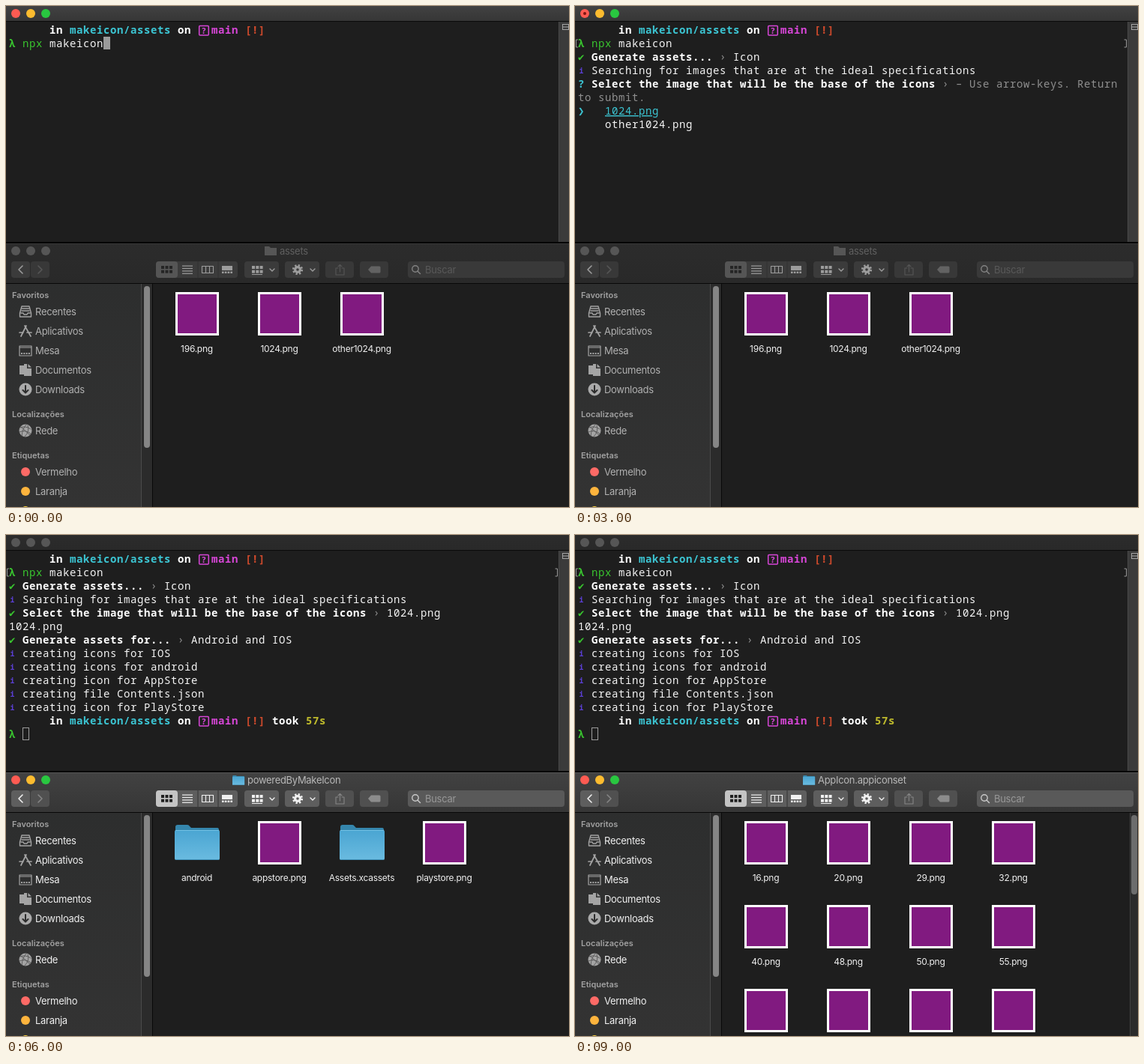
An HTML page for the animation above (10 s loop, 751 px wide and 669 px high).

```html
<!DOCTYPE html>
<html lang="pt">
<head>
<meta charset="utf-8">
<title>makeicon</title>
<style>
  html, body { margin: 0; width: 100%; height: 100%; overflow: hidden; background: #1e1e1e; }
  svg { display: block; width: 751px; height: 669px; }
  text { white-space: pre; font: 13px Inter, sans-serif; letter-spacing: -.3px; }
  .mono { font: 500 14px 'Noto Sans Mono', 'DejaVu Sans Mono', monospace; letter-spacing: .6px; }
  .bold { font-weight: 700; }
  .under { text-decoration: underline; }
  .label { font-size: 12px; letter-spacing: -.26px; text-anchor: middle; }
  .head { font-size: 11px; font-weight: 600; letter-spacing: 0; }
</style>
</head>
<body>
<svg id="stage" viewBox="0 0 751 669">
  <defs>
    <linearGradient id="lit" x2="0" y2="1"><stop stop-color="#424242"/><stop offset="1" stop-color="#363636"/></linearGradient>
    <linearGradient id="dim" x2="0" y2="1"><stop stop-color="#2c2c2c"/><stop offset="1" stop-color="#292929"/></linearGradient>
    <linearGradient id="side" x2="0" y2="1"><stop stop-color="#2d2e2e"/><stop offset="1" stop-color="#333"/></linearGradient>
    <linearGradient id="blue" x2="0" y2="1"><stop stop-color="#4aa5d2"/><stop offset="1" stop-color="#6abbe0"/></linearGradient>
    <g id="folder">
      <path d="M1 45V3Q1 0 4 0H17Q19 0 20 2L22 4H57Q59 4 59 7V45Z" fill="#3586ad"/>
      <rect y="7" width="60" height="40" rx="2" fill="url(#blue)"/>
      <path d="M1 7.5H59" stroke="#73c2e6"/>
      <path d="M1 46.5H59" stroke="#3f92bb"/>
    </g>
    <g id="picture"><rect width="58" height="58" fill="#fff"/><rect x="3" y="3" width="52" height="52" fill="#811a80"/></g>
  </defs>
  <g id="scene"></g>
</svg>
<script>
const LOOP = 10000, STEP = 1000, COL = 9, ROW = 18;
const scene = document.getElementById('scene');

// style key: [colour, extra class]
const STYLES = {
  w: ['#f4f4f4', ''], W: ['#fff', 'bold'], c: ['#3cc5d3', ''], C: ['#3cc5d3', 'bold'],
  u: ['#3cc5d3', 'under'], g: ['#39c52f', ''], G: ['#39c52f', 'bold'], d: ['#8f8f8f', ''],
  M: ['#d846d8', 'bold'], R: ['#cf4a2c', 'bold'], Y: ['#bdb92c', 'bold'], i: ['#5b3fd6', 'bold']
};

const rect = (x, y, w, h, fill, more = '') => `<rect x="${x}" y="${y}" width="${w}" height="${h}" fill="${fill}" ${more}/>`;
const circle = (x, y, r, fill) => `<circle cx="${x}" cy="${y}" r="${r}" fill="${fill}"/>`;
const text = (x, y, s, fill, cls = '') => `<text x="${x}" y="${y}" fill="${fill}" class="${cls}">${s}</text>`;
const stroke = (d, color, w = 1.3) => `<path d="${d}" fill="none" stroke="${color}" stroke-width="${w}" stroke-linecap="round" stroke-linejoin="round"/>`;
const fill = (d, color) => `<path d="${d}" fill="${color}" fill-rule="evenodd"/>`;

// terminal lines: flat lists of style, text, style, text...
const home = ['W', '      in ', 'C', 'makeicon/assets', 'W', ' on ', 'box', '  ', 'M', 'main ', 'R', '[!]'];
const command = ['G', 'λ ', 'g', 'npx ', 'w', 'makeicon'];
const ask = q => ['C', '? ', 'W', q, 'd', ' › – Use arrow-keys. Return to submit.'];
const done = (q, a) => ['G', '✔ ', 'W', q, 'd', ' › ', 'w', a];
const info = s => ['i', 'i ', 'w', s];
const chosen = (s, hint = '') => ['C', '❯   ', 'u', s, 'd', hint];
const option = (s, style = 'w') => [style, '    ' + s];

const KIND = 'Generate assets...', BASE = 'Select the image that will be the base of the icons', FOR = 'Generate assets for...';
const begin = [home, command];
const searched = [...begin, done(KIND, 'Icon'), info('Searching for images that are at the ideal specifications')];
const based = [...searched, done(BASE, '1024.png'), ['w', '1024.png']];
const SCREENS = {
  typed: begin,
  kind: [...begin, ask(KIND), option('Icon and Splash', 'd'), chosen('Icon', ' – Create icon only'), option('Splash', 'd')],
  base: [...searched, ['C', '? ', 'W', BASE, 'd', ' › – Use arrow-keys. Return'], ['d', 'to submit.'],
    chosen('1024.png'), option('other1024.png')],
  platform: [...based, ask(FOR), chosen('Android and IOS'), option('Android'), option('IOS')],
  finished: [...based, done(FOR, 'Android and IOS'), info('creating icons for IOS'), info('creating icons for android'),
    info('creating icon for AppStore'), info('creating file Contents.json'), info('creating icon for PlayStore'),
    [...home, 'W', ' took ', 'Y', '57s'], ['G', 'λ ']]
};

const pngs = names => names.split(' ').map(n => n + '.png');
const FOLDERS = {
  assets: ['assets', 365, pngs('196 1024 other1024')],
  created: ['assets', 365, [...pngs('196 1024 other1024'), '/poweredByMakeI|con']],
  powered: ['poweredByMakeIcon', 322, ['/android', 'appstore.png', '/Assets.xcassets', 'playstore.png']],
  xcassets: ['Assets.xcassets', 336, ['/AppIcon.appicons|et']],
  iconset: ['AppIcon.appiconset', 324, pngs('16 20 29 32 40 48 50 55 57 58 60 64')]
};

// one entry per second: screen, folder
const STEPS = [
  ['typed', 'assets'], ['typed', 'assets'], ['kind', 'assets'], ['base', 'assets'], ['platform', 'assets'],
  ['finished', 'created'], ['finished', 'powered'], ['finished', 'powered'], ['finished', 'xcassets'], ['finished', 'iconset']
];

function lights(y, on) {
  const colors = on ? ['#fe5b52', '#fdbc2f', '#29c740'] : Array(3).fill('#565656');
  return colors.map((c, i) => circle(13 + 20 * i, y, 6, c)).join('');
}

function line(parts, row) {
  let col = 0, out = '';
  const y = 37 + ROW * row;
  for (let i = 0; i < parts.length; i += 2) {
    const key = parts[i], s = parts[i + 1], body = s.trimStart();
    const x = 4 + COL * (col + s.length - body.length);
    if (key === 'box') {
      out += rect(4 + COL * col + 1.7, y - 10.5, 12.6, 12.4, 'none', 'stroke="#d846d8" stroke-width="1.5" rx="1"')
        + `<text x="${4 + COL * col + 4.6}" y="${y - .3}" fill="#d846d8" class="mono bold" style="font-size:11px">?</text>`;
    } else if (key === 'i') {
      out += `<text x="${x + 1.5}" y="${y - 1}" fill="${STYLES.i[0]}" class="mono bold" style="font-size:10px">i</text>`;
    } else if (body) {
      out += text(x, y, body.trimEnd(), STYLES[key][0], 'mono ' + STYLES[key][1]);
    }
    col += s.length;
  }
  return out;
}

function terminal(name, active) {
  const typed = name === 'typed', finished = name === 'finished';
  let out = rect(0, 0, 751, 317, '#1e1e1e') + rect(0, 0, 751, 20, active ? 'url(#lit)' : 'url(#dim)')
    + rect(0, 20, 751, 1, '#0a0a0a') + lights(10, active);
  if (!typed && !finished) out += circle(13, 10, 2, '#7c1310');
  out += rect(738, 21, 13, 294, '#3b3b3b') + rect(737, 21, 1, 294, '#494949')
    + rect(742.5, 24.5, 8, 7, 'none', 'stroke="#a5a5a5"') + rect(742, 27.5, 9, 1, '#a5a5a5');
  out += SCREENS[name].map(line).join('');
  if (!typed) out += stroke('M3.5 45H1.5V55H3.5M733 45H735.5V55H733', '#9a9a9a', 1);
  if (typed) out += rect(130, 41, 9, 17, '#9b9b9b');
  if (finished) out += active ? rect(22, 256, 9, 18, '#a2a2a2')
    : rect(22.5, 257.5, 8, 16, 'none', 'stroke="#9b9b9b"');
  return out + rect(0, 315, 751, 2, '#050505');
}

function toolbar(active) {
  const bg = active ? '#5e5e5e' : '#3b3b3b', off = active ? '#505050' : '#383838';
  const ink = active ? '#f0f0f0' : '#9c9c9c', faint = active ? '#858585' : '#565656';
  const picked = active ? '#c4c4c4' : '#555', pickedInk = active ? '#202020' : '#252525';
  const button = (x, w, c) => rect(x, 341, w, 22, c, 'rx="4"');
  const grid = (x, c, w, h, gap, rows) => {
    let s = '';
    for (let r = 0; r < rows; r++) for (let i = 0; i < 3; i++) s += rect(x + i * (w + gap), 347 + r * (h + 1.7), w, h, c);
    return s;
  };
  const chevron = x => stroke(`M${x - 3} 351L${x} 354L${x + 3} 351`, ink, 1.4);
  let out = button(7, 25, bg) + button(33, 25, off) + stroke('M22 347L17 352L22 357', ink, 1.6) + stroke('M43 347L48 352L43 357', faint, 1.6)
    + button(200, 109, bg) + button(200, 29, picked) + grid(207, pickedInk, 4, 4, 1.5, 2);
  for (let i = 0; i < 4; i++) out += rect(235, 346.5 + 3.4 * i, 14, 1.2, ink);
  out += rect(255.5, 341, 1, 22, '#333') + rect(282.5, 341, 1, 22, '#333')
    + stroke('M261.5 347.5H276.5V356.5H261.5ZM266.5 348V356M271.5 348V356', ink, 1.1)
    + rect(288, 347, 14, 6, ink);
  for (let i = 0; i < 4; i++) out += rect(288 + 3.8 * i, 354.5, 2.6, 2.5, ink);
  out += button(318, 46, bg) + grid(328, ink, 4, 4, 1.3, 2) + rect(328, 358, 14, 1, ink) + chevron(355)
    + button(372, 46, bg) + `<circle cx="389" cy="352" r="5.6" fill="none" stroke="${ink}" stroke-width="3" stroke-dasharray="2.2"/>`
    + circle(389, 352, 5, ink) + circle(389, 352, 1.8, bg) + chevron(409)
    + button(426, 38, off) + stroke('M443 350H440V359H451V350H448M445.5 355V345.5M443 348L445.5 345.5L448 348', faint, 1.1)
    + button(472, 38, off) + fill('M483 352L487 347.5H498Q499.500 347.5 499.500 349V355Q499.500 356.500 498 356.500H487Z', active ? '#8c8c8c' : '#626262');
  out += rect(536, 341, 209, 22, active ? '#595959' : '#393939', 'rx="4"')
    + `<circle cx="546" cy="351" r="4.2" fill="none" stroke="${active ? '#c8c8c8' : '#828282'}" stroke-width="1.4"/>`
    + stroke('M549 354L552.500 357.500', active ? '#c8c8c8' : '#828282', 1.5);
  return out + text(559, 357, 'Buscar', active ? '#989898' : '#595959');
}

function sidebar(active) {
  const ink = active ? '#f0f0f0' : '#b1b1b1', icon = '#a4a4a4';
  let out = rect(0, 371, 181, 298, 'url(#side)') + rect(180, 371, 1, 298, '#4a4a4a') + rect(181, 371, 14, 298, '#2b2b2b')
    + rect(195, 371, 1, 298, '#080808') + rect(184, 374, 8, 216, '#858585', 'rx="4"');
  [['Favoritos', 390], ['Localizações', 549], ['Etiquetas', 604]].forEach(([s, y]) => out += text(8, y, s, '#a2a2a2', 'head'));
  ['Recentes', 'Aplicativos', 'Mesa', 'Documentos', 'Downloads'].forEach((s, i) => out += text(39, 413 + 26 * i, s, ink));
  out += text(39, 572, 'Rede', ink) + text(39, 627, 'Vermelho', ink) + text(39, 653, 'Laranja', ink);
  out += stroke('M21 401H31L33.500 410V415H18.500V410ZM21.500 404H30.500M21 407H31M20 410H23L24 412H28L29 410H32', icon, 1.4)
    + stroke('M20 441L27 427M25 427L33 441M18 436H23M28 436H34', icon, 1.7)
    + stroke('M18 454H34V467H18ZM18 456H34', icon, 1.2);
  for (let i = 0; i < 4; i++) out += rect(20 + 3.300 * i, 463, 2, 2, icon);
  out += fill('M18 480H24V492H18ZM24 478H28V484H34V494H24ZM29.500 478L34 482.500H29.500Z', icon)
    + circle(26, 512, 8.5, '#aaa') + stroke('M26 507V516M22.500 513L26 516.500L29.500 513', '#2d2d2d', 2)
    + circle(26, 567, 8.5, '#a4a4a4')
    + stroke('M19 563Q26 560 33 565M18 569Q25 565 33 571M21 574Q22 564 27 559M25 575Q32 568 29 560M20 562L32 573', '#555', .9)
    + circle(26, 622, 6, '#fd6a66') + circle(26, 648, 6, '#fdb43d') + circle(26, 674, 6, '#fdd33b');
  return out;
}

function files(items) {
  return items.map((item, i) => {
    const x = 226 + 110 * (i % 4), y = 382 + 112 * Math.floor(i / 4), isFolder = item[0] === '/';
    const shape = isFolder ? `<use href="#folder" x="${x - 1}" y="${y + 5}"/>` : `<use href="#picture" x="${x}" y="${y}"/>`;
    const label = item.replace('/', '').split('|');
    return shape + label.map((s, n) => text(x + 28.5, y + 80 + 16 * n, s, '#f0f0f0', 'label')).join('');
  }).join('');
}

function finder(name, active) {
  const [title, x, items] = FOLDERS[name];
  let out = rect(0, 317, 751, 53, active ? 'url(#lit)' : 'url(#dim)') + rect(0, 317, 751, 1, active ? '#565656' : '#383838')
    + rect(0, 370, 751, 1, '#080808') + lights(327, active);
  out += active ? `<use href="#folder" transform="translate(${x - 20} 321) scale(.27)"/>`
    : fill(`M${x - 20} 333V321H${x - 14}L${x - 12} 323H${x - 4}V333Z`, '#565656');
  out += text(x, 332, title, active ? '#b9b9b9' : '#606060') + toolbar(active)
    + rect(196, 371, 555, 298, '#1e1e1e') + files(items) + sidebar(active);
  if (items.length > 8) out += rect(740, 371, 11, 298, '#2b2b2b') + rect(740, 371, 1, 298, '#414141')
    + rect(742, 374, 8, 106, '#6d6d6d', 'rx="4"');
  return out;
}

let shown = -1;
function draw(now) {
  const step = Math.floor(now % LOOP / STEP);
  if (step !== shown) {
    const [screen, folder] = STEPS[step], browsing = !['assets', 'created'].includes(folder);
    scene.innerHTML = terminal(screen, !browsing) + finder(folder, browsing);
    shown = step;
  }
}
const start = performance.now();
function tick() {
  draw(performance.now() - start);
  requestAnimationFrame(tick);
}
tick();
</script>
</body>
</html>
```
